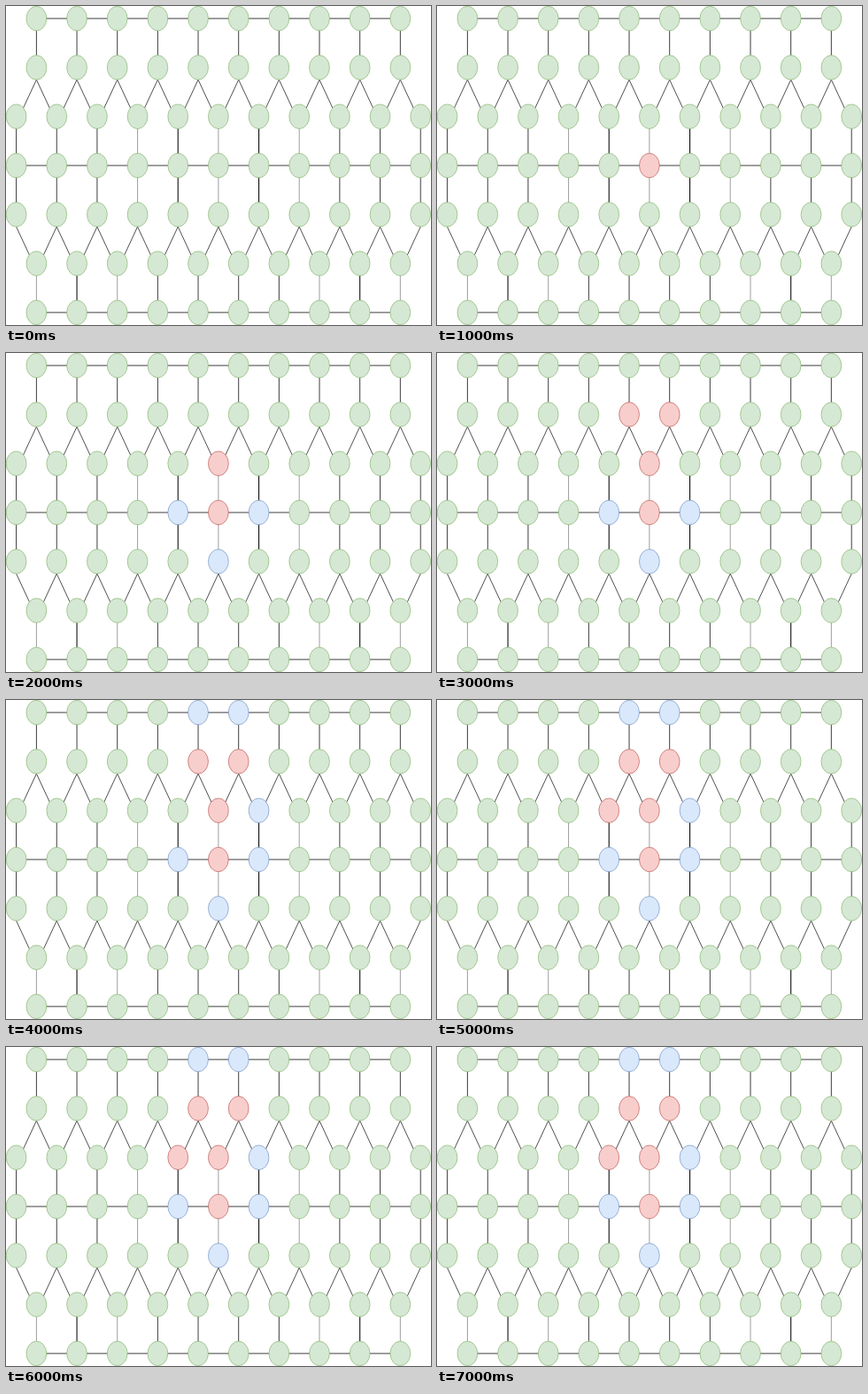
An HTML page for the animation above (8 s loop, 480x360 px).

```html
<!DOCTYPE html>
<html lang="en">
<head>
<meta charset="utf-8">
<title>Spread on a lattice</title>
<style>
html, body { margin: 0; width: 100%; height: 100%; overflow: hidden; background: #fff; }
svg { display: block; width: 480px; height: 360px; }
line { stroke: #333; stroke-width: .95; }
line.dark { stroke: #111; stroke-width: 1.1; }
line.pale { stroke: #999; }
line.slant { stroke: #222; stroke-width: .8; }
ellipse { fill: #d5e8d4; stroke: #82b366; stroke-width: .65; }
ellipse.red { fill: #f8cecc; stroke: #b85450; }
ellipse.blue { fill: #dae8fc; stroke: #6c8ebf; }
</style>
</head>
<body>
<svg viewBox="0 0 480 360"></svg>
<script>
const LOOP = 8000, RX = 11.4, RY = 13.8, DX = 45.66, DY = 55.3;
const svg = document.querySelector('svg');
const wide = row => row >= 2 && row <= 4;
const count = row => wide(row) ? 11 : 10;
const px = (row, col) => (wide(row) ? 11.6 : 34.4) + col * DX;
const py = row => 14.1 + row * DY;

// time, row, column, colour
const steps = [
  [1000, 3, 5, 'red'],
  [2000, 2, 5, 'red'], [2000, 3, 4, 'blue'], [2000, 3, 6, 'blue'], [2000, 4, 5, 'blue'],
  [3000, 1, 4, 'red'], [3000, 1, 5, 'red'],
  [4000, 0, 4, 'blue'], [4000, 0, 5, 'blue'], [4000, 2, 6, 'blue'],
  [5000, 2, 4, 'red']
];

function add(tag, attrs) {
  const el = document.createElementNS('http://www.w3.org/2000/svg', tag);
  for (const key in attrs) el.setAttribute(key, attrs[key]);
  return svg.appendChild(el);
}

function edge(x1, y1, x2, y2, kind = '') {
  add('line', { x1, y1, x2, y2, class: kind });
}

function tone(row, col) {
  if (row === 5) return [0, 2, 7, 9].includes(col) ? 'pale' : [1, 8].includes(col) ? 'dark' : '';
  if (wide(row)) return [3, 5, 7].includes(col) ? 'pale' : [4, 6].includes(col) ? 'dark' : '';
  return '';
}

for (const row of [0, 3, 6])
  for (let c = 0; c < count(row) - 1; c++)
    edge(px(row, c), py(row), px(row, c + 1), py(row));

for (const row of [0, 2, 3, 5])
  for (let c = 0; c < count(row); c++)
    edge(px(row, c), py(row), px(row, c), py(row + 1), tone(row, c));

// slanted edges run from a node's foot to the shoulders of the nodes below
for (const row of [1, 4])
  for (let c = 0; c < count(row); c++)
    for (const side of [-1, 1]) {
      const x = px(row, c), end = x + side * DX / 2;
      if (end < px(row + 1, 0) - 1 || end > px(row + 1, count(row + 1) - 1) + 1) continue;
      edge(x, py(row) + RY, end - side * RX * .7, py(row + 1) - RY * .7, 'slant');
    }

const nodes = [];
for (let row = 0; row < 7; row++) {
  nodes[row] = [];
  for (let c = 0; c < count(row); c++)
    nodes[row][c] = add('ellipse', { cx: px(row, c), cy: py(row), rx: RX, ry: RY });
}

const start = performance.now();
function draw(now) {
  const t = Math.max(0, now - start) % LOOP;
  for (const [at, row, col, colour] of steps)
    nodes[row][col].setAttribute('class', t >= at ? colour : '');
  requestAnimationFrame(draw);
}
draw(start);
</script>
</body>
</html>
```
